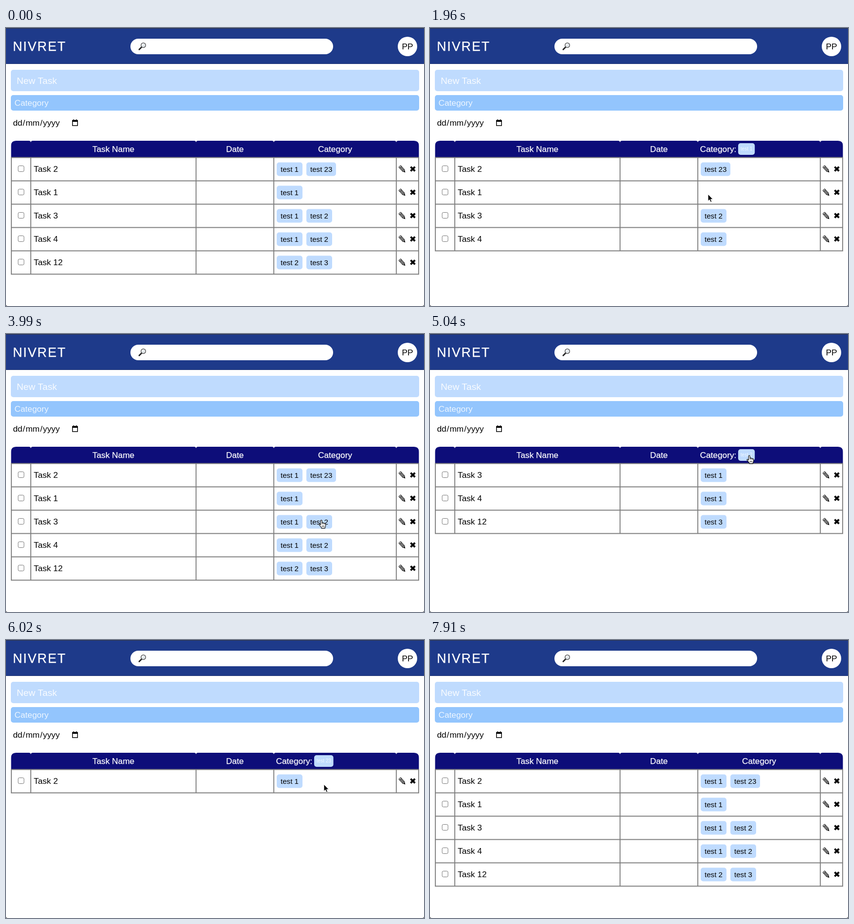
Animation of 860 by 572 pixels, one loop 8960 ms. Source, as an HTML page:

```html
<!DOCTYPE html>
<html lang="en">
<head>
<meta charset="utf-8">
<title>Task list</title>
<style>
  html, body { margin: 0; width: 860px; height: 572px; overflow: hidden; background: #fff; }
  svg { display: block; }
  text { font: 17.28px "Liberation Sans", Arial, sans-serif; white-space: pre; }
  .light { fill: #fff; stroke: #fff; stroke-width: .25; }
  .tag { font-size: 15.1px; }
  .small { font-size: 10px; fill: #f1f7ff; }
  .mid { text-anchor: middle; }
</style>
</head>
<body>
<svg width="860" height="572" viewBox="0 0 860 572">
  <defs>
    <g id="pencil" transform="rotate(48)" fill="none" stroke="#111" stroke-width="1">
      <path d="M-7 -2.6H4L8.4 0L4 2.6H-7Q-8.2 0 -7 -2.6zM-5 -.9H4M-5 .9H4M-5 -2.6V2.6M4 -2.6V2.6"/>
      <path d="M6 -1.3L8.6 0L6 1.3z" fill="#111"/>
    </g>
    <path id="cross" d="M-4.4 -4.4L4.4 4.4M4.4 -4.4L-4.4 4.4" stroke="#000" stroke-width="4"/>
  </defs>

  <rect width="860" height="74" fill="#1e3a8a"/>
  <rect width="860" height="1" fill="#33363d"/>
  <rect y="73" width="860" height="1" fill="#1b3172"/>
  <text class="light" x="14" y="47" style="font-size:26.88px;letter-spacing:1.92px">NIVRET</text>
  <rect x="256" y="22" width="417" height="32" rx="16" fill="#fff"/>
  <path d="M274 44.3L279 39.2" stroke="#222" stroke-width="2.8" stroke-linecap="round"/>
  <circle cx="282.6" cy="35.4" r="4.8" fill="#e4e9ec" stroke="#444" stroke-width="1.2"/>
  <path d="M280 35Q280.4 32.8 283 32.6" fill="none" stroke="#fff" stroke-width="1.2"/>
  <circle cx="826" cy="38" r="20" fill="#fff"/>
  <text class="mid" x="826" y="43.5">PP</text>

  <rect x="10" y="86" width="840" height="44" rx="5" fill="#bfdbfe"/>
  <text x="22" y="114.5" fill="#f8fbff" style="font-size:19.2px">New Task</text>
  <rect x="10" y="138" width="840" height="32" rx="5" fill="#93c5fd"/>
  <text x="17.5" y="160" fill="#eef6ff">Category</text>
  <g id="date"></g>
  <path d="M136.8 190.3H147.2V200.7H136.8z" fill="none" stroke="#000" stroke-width="1.5"/>
  <path d="M136.8 189.6H147.2V193H136.8zM138.4 188H140V190H138.4zM144 188H145.6V190H144z"/>

  <g id="head" fill="#0d0d79"></g>
  <text class="light mid" x="221" y="255">Task Name</text>
  <text class="light mid" x="471" y="255">Date</text>
  <g id="table"></g>
  <path d="M0 569Q.3 571.7 3 572H0zM860 569Q859.7 571.7 857 572H860z" fill="#555"/>

  <g id="cursor">
    <path id="arrow" d="M0 0V14.2L3.2 11.3L5.4 16.3L7.8 15.2L5.6 10.4H10z" fill="#000" stroke="#fff" stroke-width="1" stroke-linejoin="round"/>
    <g id="hand">
      <path d="M-1.6 9.6V1.4Q-1.5 0 -.2 0Q1.2 0 1.3 1.4V5.6Q2.7 4.6 3.9 6Q5.4 5.2 6.4 6.7Q8.6 6.2 8.7 8.4V11Q8.6 13.4 7.4 14.6V16.6H-.2V15L-4.4 9.8Q-5.3 8.4 -4.2 7.8Q-3.2 7.3 -1.6 9.6z" fill="#fff" stroke="#000" stroke-width="1.1" stroke-linejoin="round"/>
      <path d="M1.4 5.6V8.6M3.9 6.2V8.8M6.4 6.9V9M1.4 11V14M3.4 11V14M5.4 11V14" stroke="#000" stroke-width=".8"/>
    </g>
    <g id="beam" fill="none" stroke-linecap="round">
      <path d="M-3 -8Q0 -8 0 -6V6Q0 8 -3 8M3 -8Q0 -8 0 -6M0 6Q0 8 3 8" stroke="#fff" stroke-width="2.4"/>
      <path d="M-3 -8Q0 -8 0 -6V6Q0 8 -3 8M3 -8Q0 -8 0 -6M0 6Q0 8 3 8" stroke="#000" stroke-width="1.1"/>
    </g>
  </g>
</svg>
<script>
const LOOP = 8960, TICK = 70, ROW = 48, TOP = 266.5;
const columns = [11, 51, 391, 551, 803, 849];
const tasks = [
  ['Task 2', 'test 1', 'test 23'],
  ['Task 1', 'test 1'],
  ['Task 3', 'test 1', 'test 2'],
  ['Task 4', 'test 1', 'test 2'],
  ['Task 12', 'test 2', 'test 3']
];
const filters = [
  { from: 1820, to: 3080, tag: 'test 1' },
  { from: 4200, to: 5180, tag: 'test 2' },
  { from: 6020, to: 7000, tag: 'test 23' }
];
// Mouse moves: start and end time, end point, optional bend point
const start = [484, 555];
const moves = [
  { from: 490, to: 980, end: [598, 337] },
  { from: 1540, to: 1680, end: [572, 342] },
  { from: 2380, to: 2870, end: [659, 242] },
  { from: 3220, to: 3710, end: [650, 375], bend: [682, 310] },
  { from: 3780, to: 3990, end: [649, 383] },
  { from: 4410, to: 5040, end: [657, 250], bend: [688, 316] },
  { from: 5460, to: 5740, end: [654, 297], bend: [668, 275] },
  { from: 6160, to: 6790, end: [657, 251], bend: [704, 270] },
  { from: 7420, to: 7910, end: [485, 584], bend: [728, 430] }
];

const $ = id => document.getElementById(id);
const tagWidth = tag => tag.length > 6 ? 61 : 53;
const inside = ([x, y], [left, top, width, height]) =>
  x >= left && x <= left + width && y >= top && y <= top + height;

let x = 14.4;
for (const [part, width] of [['dd', 19.2], ['/', 4.8], ['mm', 28.8], ['/', 4.8], ['yyyy', 34.6]]) {
  $('date').innerHTML += `<text x="${x}" y="200.5">${part}</text>`;
  x += width + 1;
}

$('head').innerHTML = columns.slice(1).map((right, i) => {
  const left = i ? columns[i] : 10.5, last = i === 4;
  const end = last ? 849.5 : right, a = i ? 4 : 10, b = last ? 10 : 4;
  return `<path d="M${left} 266V${232 + a}Q${left} 232 ${left + a} 232H${end - b}Q${end} 232 ${end} ${232 + b}V266z"/>`;
}).join('');

function layout(filter) {
  const shown = tasks.filter(task => !filter || task.includes(filter));
  return shown.map(([name, ...tags], i) => {
    let left = 557;
    const chips = tags.filter(tag => tag !== filter).map(tag => {
      const box = [left, TOP + i * ROW + 10, tagWidth(tag), 28];
      left += box[2] + 8;
      return { tag, box };
    });
    return { name, chips, y: TOP + i * ROW + 24 };
  });
}

const chipSvg = ([left, top, width, height], tag, style, pad, base) =>
  `<rect x="${left}" y="${top}" width="${width}" height="${height}" rx="5" fill="#bfdbfe"/>
   <text class="${style}" x="${left + pad}" y="${top + base}">${tag}</text>`;

const headChip = filter => [634, 237, filter.length > 6 ? 39.6 : 34.2, 24];

function drawTable(rows, filter) {
  const bottom = TOP + rows.length * ROW;
  const lines = columns.map(c => `M${c} ${TOP - 1}V${bottom + 1}`).join('') +
    [...rows, 0].map((_, i) => `M10 ${TOP + i * ROW}H850`).join('');
  const title = filter
    ? `<text class="light" x="555.5" y="255">Category:</text>` + chipSvg(headChip(filter), filter, 'small', 4.8, 15.3)
    : `<text class="light mid" x="677" y="255">Category</text>`;
  $('table').innerHTML = title + `<path d="${lines}" stroke="#808080" stroke-width="1.9"/>` +
    rows.map(({ name, chips, y }) =>
      `<rect x="25" y="${y - 7}" width="12" height="12" rx="2.5" fill="#fff" stroke="#767676"/>
       <text x="57" y="${y + 5.5}">${name}</text>
       ${chips.map(({ tag, box }) => chipSvg(box, tag, 'tag', 8, 19.2)).join('')}
       <use href="#pencil" x="0" y="0" transform="translate(815 ${y - .5})"/>
       <use href="#cross" transform="translate(837 ${y - .5})"/>`).join('');
}

function pointer(t) {
  let at = start;
  for (const { from, to, end, bend } of moves) {
    if (t < from) break;
    const p = Math.min(1, (t - from) / (to - from)), u = p * p * (3 - 2 * p);
    const origin = at;
    at = end.map((e, i) => {
      const mid = bend ? bend[i] : (origin[i] + e) / 2;
      return (1 - u) ** 2 * origin[i] + 2 * u * (1 - u) * mid + u * u * e;
    });
  }
  return at;
}

function cursorKind(t, at, rows, filter) {
  if (t < 1610) return 'arrow';
  if (filter && inside(at, headChip(filter))) return 'hand';
  if (!filter && inside(at, [642, 239, 70, 20])) return 'beam';
  return rows.some(row => row.chips.some(chip => inside(at, chip.box))) ? 'hand' : 'arrow';
}

let drawn, rows;
function render(time) {
  const t = Math.floor((time % LOOP) / TICK) * TICK;
  const filter = filters.find(f => t >= f.from && t < f.to)?.tag ?? '';
  if (filter !== drawn) {
    rows = layout(filter);
    drawTable(rows, filter);
    drawn = filter;
  }
  const at = pointer(t), kind = cursorKind(t, at, rows, filter);
  $('cursor').setAttribute('transform', `translate(${at.join(' ')})`);
  $('cursor').style.display = t >= 560 && t < 7910 ? '' : 'none';
  for (const id of ['arrow', 'hand', 'beam']) $(id).style.display = id === kind ? '' : 'none';
}

const begin = performance.now();
function frame() {
  render(performance.now() - begin);
  requestAnimationFrame(frame);
}
frame();
</script>
</body>
</html>
```
